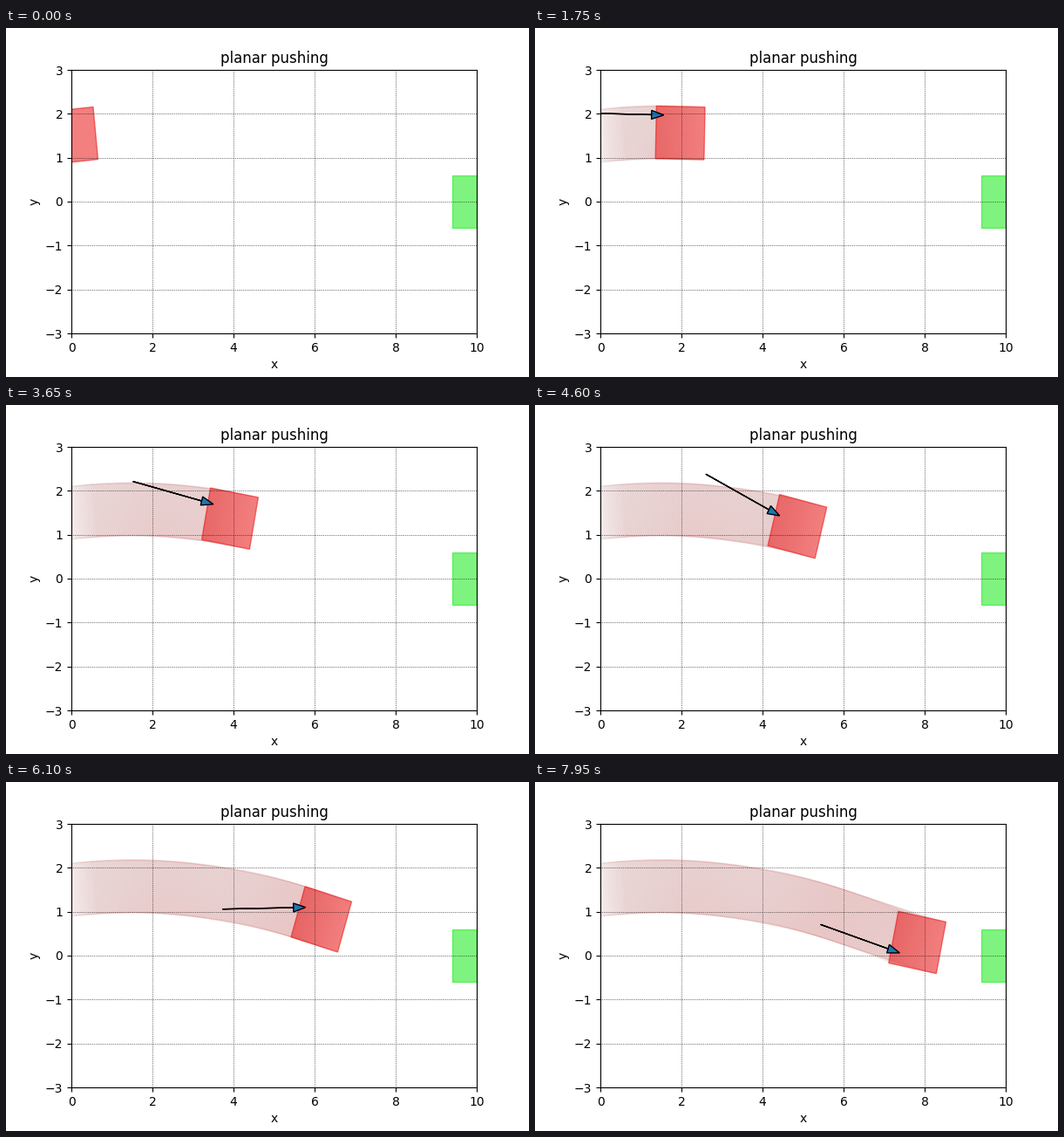
A matplotlib script for the animation above (8000 ms loop, 600x400 px).

```python
import numpy as np
import matplotlib.pyplot as plt
from matplotlib.animation import FuncAnimation
from matplotlib.collections import PolyCollection
from matplotlib.patches import Polygon

FRAMES, INTERVAL = 160, 50
SIDE = 1.2
HEAD_W, HEAD_L = 0.2, 0.3
PUSH_LEN = 2.05
RED, GREEN = (0.91, 0.0, 0.0), (0.0, 0.91, 0.0)

# Key points of the push: frame, tip in the slider's axes, arrow heading
PUSHES = [
    (0, -0.37, 0.45, -0.03),
    (53, -0.44, 0.37, -0.02),
    (92, -0.48, 0.13, -0.48),
    (122, -0.45, 0.15, 0.02),
    (140, -0.31, -0.37, -0.024),
    (159, -0.38, -0.32, -0.32),
]


def pose(k):
    """Slider centre and angle: a slowing drift along a falling arc."""
    u = k / (FRAMES - 1)
    x = u * (9.35 - 2.0 * u + 0.44 * u * u) + 0.033 * np.sin(13.66 * u)
    y = 1.5 + u * (0.935 - 3.11 * u + 0.975 * u * u)
    angle = 0.1 - u * (0.61 - 1.06 * (u - 0.46) ** 2)
    return x, y, angle


def push(k):
    """Arrow tip in the slider's axes and heading in the world."""
    times, *tracks = zip(*PUSHES)
    tip_x, tip_y, heading = (np.interp(k, times, track) for track in tracks)
    return (tip_x, tip_y), heading


def to_world(x, y, angle, points):
    c, s = np.cos(angle), np.sin(angle)
    return np.asarray(points) @ np.array([[c, s], [-s, c]]) + (x, y)


def square(x, y, angle):
    r = SIDE / 2
    return to_world(x, y, angle, [(-r, -r), (r, -r), (r, r), (-r, r)])


squares = [square(*pose(k)) for k in range(FRAMES)]

plt.rcParams["text.kerning_factor"] = 6
fig, ax = plt.subplots(figsize=(6, 4), dpi=100)
fig.subplots_adjust(left=0.125, right=0.9, bottom=0.125, top=0.88)
ax.set_xticks(range(0, 11, 2))
ax.set_yticks(range(-3, 4))
ax.set_title("planar pushing")
ax.set_xlabel("x")
ax.set_ylabel("y")
ax.grid(color="k", linestyle=":", linewidth=0.5)

# Faint layers that build up into the swept path
trail = PolyCollection([], facecolors=[RED], edgecolors=[RED],
                       linewidths=1, alpha=0.008)
ax.add_collection(trail, autolim=False)
ax.add_patch(Polygon(square(10, 0, 0), color=GREEN, alpha=0.5))
slider = ax.add_patch(Polygon(squares[0], color=RED, alpha=0.5))
arrow = ax.arrow(0, 0, 1, 0, head_width=HEAD_W, head_length=HEAD_L)
ax.set_xlim(0, 10)
ax.set_ylim(-3, 3)


def update(k):
    trail.set_verts(squares[:k])
    slider.set_xy(squares[k])
    tip, heading = push(k)
    ahead = np.array([np.cos(heading), np.sin(heading)])
    x, y = to_world(*pose(k), tip) - PUSH_LEN * ahead
    dx, dy = (PUSH_LEN - HEAD_L) * ahead
    arrow.set_data(x=x, y=y, dx=dx, dy=dy)
    return trail, slider, arrow


anim = FuncAnimation(fig, update, frames=FRAMES, interval=INTERVAL,
                     repeat=True, repeat_delay=0, blit=False)
plt.show()
```
